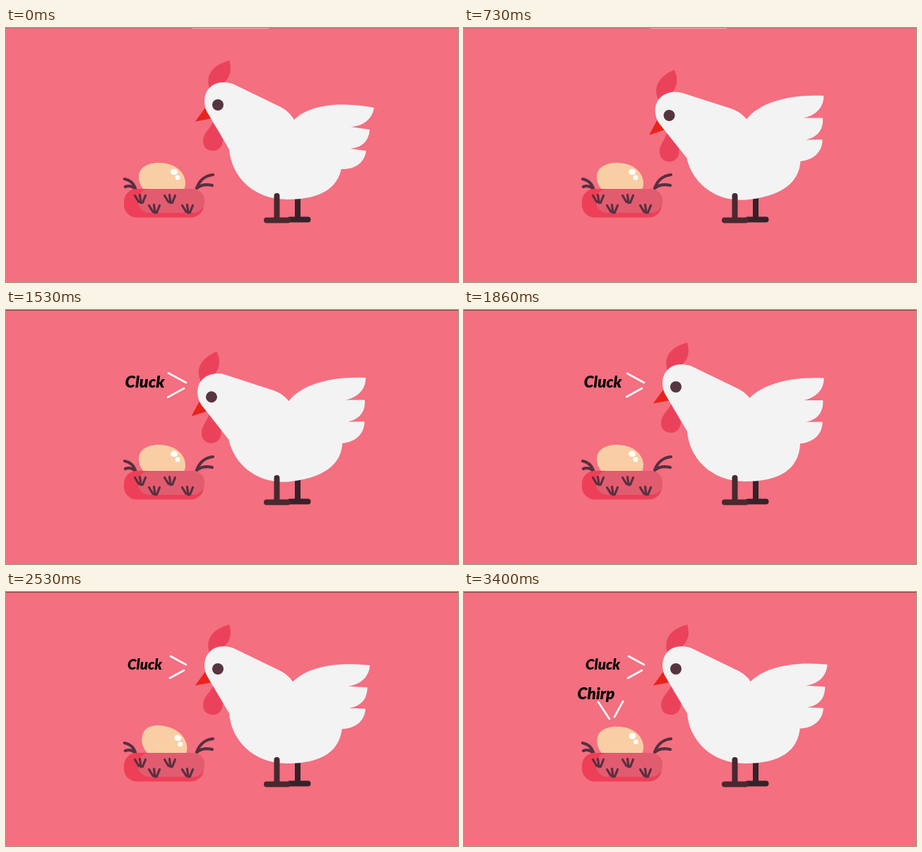
Recreate the animation shown at these times as an HTML page. Size 640 by 360 pixels, loop 3470 ms.

```html
<!DOCTYPE html>
<html lang="en">
<head>
<meta charset="utf-8">
<title>Hen and egg</title>
<style>
html, body { margin: 0; width: 100%; height: 100%; overflow: hidden; background: #f46f80; }
svg { display: block; width: 640px; height: 360px; }
text { font: italic 900 20.5px Lato, sans-serif; text-anchor: middle; }
.stroke { fill: none; stroke-linecap: round; stroke-linejoin: round; }
.ray { stroke: #fff; stroke-width: 2.6; }
</style>
</head>
<body>
<svg viewBox="0 0 640 360">
  <defs>
    <path id="tuft" class="stroke" stroke="#573040" stroke-width="3.2" d="M-7.5-4.5L-2 4.5M-.5-5.5L1 6M7.5-4.5L3.5 5.5"/>
  </defs>
  <rect width="640" height="360" fill="#f46f80"/>
  <rect id="topLine" width="640" height="1"/>
  <rect id="topGlow" x="264" width="108" height="1" fill="#f8a9b2"/>

  <path class="stroke" stroke="#573040" stroke-width="4.2" d="M168 214Q179 216 183 227M169 225Q176 222 183 228M293 208Q276 210 270 227M292 223Q279 220 270 227"/>
  <g id="egg">
    <path fill="#f9cea4" d="M188 211C188 198 200 191 217 191C240 191 254 205 254 220C254 235 240 240 222 240C204 240 188 228 188 211Z"/>
    <ellipse cx="238" cy="204" rx="5" ry="4.3" fill="#fff"/>
    <circle cx="243" cy="212" r="3.4" fill="#fff"/>
  </g>
  <rect x="167" y="228" width="113" height="40.5" rx="18" fill="#ee3f58"/>
  <rect x="187" y="228" width="94" height="34" rx="16" fill="#e25c6f"/>
  <use href="#tuft" x="190" y="242"/>
  <use href="#tuft" x="232" y="242"/>
  <use href="#tuft" x="210" y="256"/>
  <use href="#tuft" x="257" y="256"/>

  <path class="stroke" stroke="#35222a" stroke-width="8" d="M413 236V271M402 271.5H427.5"/>
  <path id="tail" fill="#f3f3f3" d="M400 140L408 130C428 110 470 103 521 113C519 128 507 139 488 140L515 144C514 159 505 170 487 171L510 174C508 190 495 201 474 200L440 215L390 190Z"/>
  <g id="body">
    <path fill="#eb425c" d="M289 88C281 67 292 53 316 46C321 62 316 75 302 81Z"/>
    <path fill="#eb425c" d="M294 132C289 143 279 149 279 160C279 169 285 174 293 174C302 174 307 167 307 158L303 140Z"/>
    <path fill="#e9231c" d="M268 132.5L282 113L292 128Z"/>
    <path fill="#f3f3f3" d="M408 130C403 122 398 117 389 112L325 81C319 78 314 77 308 77C291 77 281 89 281 104C281 111 283 117 287 123L316 172C319 210 350 243 398 243C448 243 474 225 476 190L470 160Z"/>
    <circle id="eye" cx="300" cy="109" r="8" fill="#573540"/>
  </g>
  <path class="stroke" stroke="#47292f" stroke-width="8" d="M383.5 238V271M369 272.4H399"/>

  <g id="cluck"><text y="7">Cluck</text></g>
  <path id="cluckRays" class="stroke ray"/>
  <g id="chirp"><text y="7">Chirp</text></g>
  <path id="chirpRays" class="stroke ray"/>
</svg>
<script>
const LOOP = 3470;
const $ = id => document.getElementById(id);
const set = (id, name, value) => $(id).setAttribute(name, value);
const show = (id, on) => set(id, 'visibility', on ? 'visible' : 'hidden');

// eased 0 to 1
const ramp = (t, start, length) =>
  (1 - Math.cos(Math.PI * Math.min(1, Math.max(0, (t - start) / length)))) / 2;

// repeated 0 to 1 to 0, at rest outside the given count
const swing = (t, start, period, count) => {
  const cycles = (t - start) / period;
  return cycles > 0 && cycles < count ? (1 - Math.cos(2 * Math.PI * cycles)) / 2 : 0;
};

// grow past full size, then settle
const pop = (t, start) => 1.14 * ramp(t, start, 500) - .14 * ramp(t, start + 500, 900);

function say(id, x, y, size, rays) {
  show(id, size > 0);
  show(id + 'Rays', size > 0);
  set(id, 'transform', `translate(${x} ${y}) scale(${size})`);
  set(id + 'Rays', 'd', rays.map(([x, y, dx, dy]) => `M${x} ${y}l${dx * size} ${dy * size}`).join(''));
}

function draw(now) {
  const t = now % LOOP;
  const nod = swing(t, 285, 780, 2);
  const flap = swing(t, 130, 400, 4) + swing(t, 1730, 292, 6);
  const tilt = swing(t, 2435, 330, 3);
  set('body', 'transform', `rotate(${-8.5 * nod} 401 183)`);
  set('tail', 'transform', `rotate(${-8.5 * flap} 401 183)`);
  set('egg', 'transform', `translate(0 ${-2 * tilt}) rotate(${18 * tilt} 219 233)`);
  show('eye', t < 2090 || t >= 2200);

  say('cluck', 196.5, 102.5, pop(t, 1000), [[255, 103, -22, -12], [252, 111, -20, 11]]);
  say('chirp', 187, 144, pop(t, 2600), [[206, 180, -14.5, -22], [213, 177, 11, -20]]);

  const early = t < 1060;
  set('topLine', 'fill', early ? '#dc6676' : '#8c414d');
  show('topGlow', early);
  requestAnimationFrame(draw);
}
requestAnimationFrame(draw);
</script>
</body>
</html>
```
